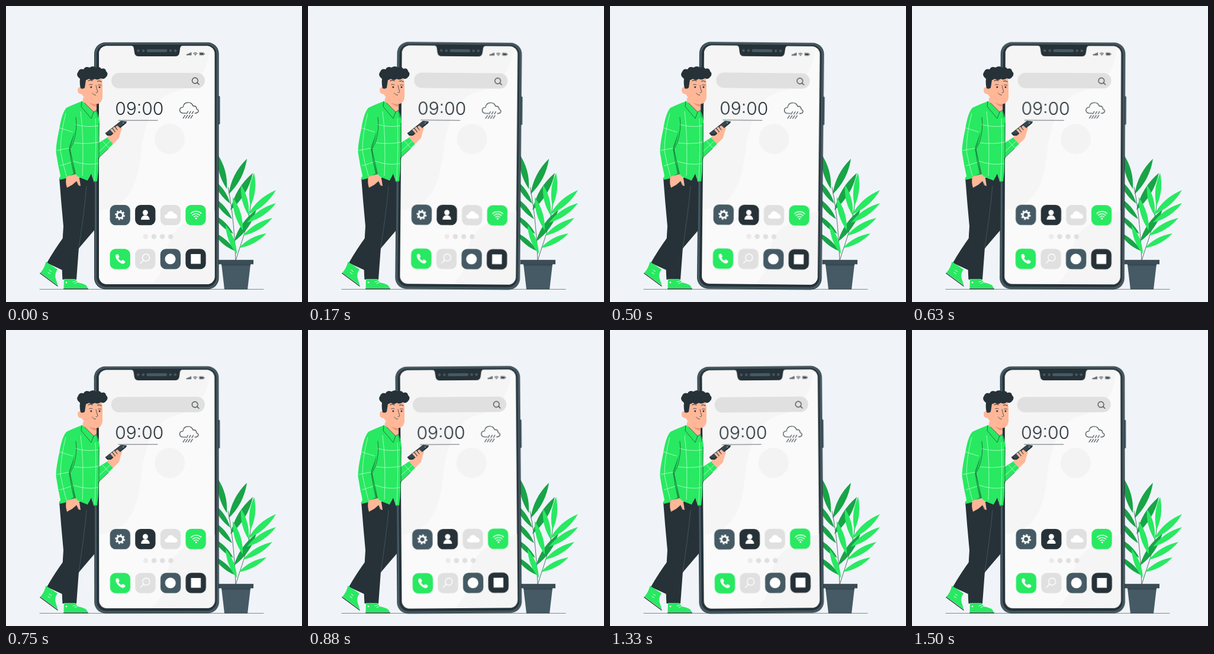
An HTML page for the animation above (1540 ms loop, 500 px wide and 500 px high).

```html
<!DOCTYPE html>
<html lang="en">
<head>
<meta charset="utf-8">
<title>Phone home screen</title>
<style>
  html, body { margin: 0; width: 100%; height: 100%; overflow: hidden; background: #f0f4f9; }
  svg { display: block; width: 100vw; height: 100vh; }
  #phone { transform-box: view-box; transform-origin: 255px 270px; }
  .ink { fill: #263238; }
  .slate { fill: #455a64; }
  .grey { fill: #e0e0e0; }
  .green { fill: #28e961; }
  .skin { fill: #ffb798; }
  .white { fill: #fff; }
  .line { fill: none; stroke: #263238; stroke-linecap: round; stroke-linejoin: round; }
  .chalk { fill: none; stroke: #fff; stroke-linecap: round; stroke-linejoin: round; }
  .plaid { fill: none; stroke: #c4ffd5; stroke-width: .75; }
  .clock { font: 300 30px Inter, "Open Sans", sans-serif; }
</style>
</head>
<body>
<svg viewBox="0 0 500 500">
  <path class="line" d="M57 478.500H435" stroke-width=".55"/>

  <g id="plant">
    <path class="line" d="M388 430C386 390 384 350 375 306M388 430C397 400 410 370 414 330" stroke-width=".7"/>
    <g id="leaves"></g>
    <path class="slate" d="M364 436H413L408 479H369Z"/>
    <path d="M364 436H413L412.700 438.500H364.300Z" fill="#37474f"/>
    <rect x="358.500" y="428.800" width="59.500" height="7.500" fill="#3b4d56"/>
  </g>

  <g id="back-leg">
    <path class="ink" d="M120 290H155V372Q141 388 125 407L95 446L69 434Q82 411 99 388Z"/>
    <path class="green" d="M67.500 432L87 445Q82 452 83.500 459L87.500 472L58 450.500Q65 443 67.500 432Z"/>
    <path class="line" d="M57.800 451.500L87 473" stroke-width="1.300"/>
    <path class="chalk" d="M73 446l3.500 2.500M71 450l3.500 2.500" stroke-width=".9"/>
  </g>

  <g id="phone">
    <rect class="slate" x="357.500" y="152" width="4" height="48" rx="1.500"/>
    <rect class="ink" x="149" y="61.500" width="210.500" height="417" rx="19"/>
    <rect class="slate" x="149.900" y="62.400" width="208.700" height="415.200" rx="18"/>
    <rect class="ink" x="153" y="65" width="202.500" height="409.500" rx="16"/>
    <clipPath id="screen"><rect x="157" y="67.500" width="195.500" height="402.500" rx="13"/></clipPath>
    <g clip-path="url(#screen)">
      <rect x="150" y="60" width="210" height="420" fill="#fafafa"/>
      <path d="M150 60H345C346 95 331 133 291 143C250 153 240 185 230 232C224 292 216 342 150 346Z" fill="#f5f5f5"/>
      <path d="M360 343C305 360 272 378 271 420C270 450 254 456 242 480H360Z" fill="#f5f5f5"/>
      <circle cx="276.500" cy="224.500" r="25.500" fill="#f3f3f3"/>
    </g>
    <path class="ink" d="M212 67Q215.500 67.500 216 72L217 79Q218 85 224 85H286Q292 85 293 79L294 72Q294.500 67.500 298 67Z"/>
    <rect class="slate" x="237.500" y="73" width="35" height="5" rx="2.500"/>
    <g class="slate">
      <circle cx="223.500" cy="75.500" r="2.300"/><circle cx="232" cy="75.500" r="2.300"/>
      <circle cx="278" cy="75.500" r="2.300"/><circle cx="286" cy="75.500" r="2.300"/>
    </g>

    <path class="ink" d="M305 81.300h1.500v1.900H305ZM307.200 80.500h1.500v2.700h-1.500ZM309.400 79.500h1.500v3.700h-1.500ZM311.600 78.500h1.500v4.700h-1.500Z"/>
    <path class="line" d="M316.500 79.900q3.300-2.600 6.600 0M317.900 81.400q1.900-1.500 3.800 0" stroke-width=".9"/>
    <circle class="ink" cx="319.800" cy="82.800" r=".8"/>
    <rect class="line" x="326.900" y="78.900" width="7.200" height="4" rx=".9" stroke-width=".7"/>
    <path class="ink" d="M327.800 79.700h5.400v2.400h-5.400ZM334.500 80.100h1v1.600h-1Z"/>

    <rect class="grey" x="178" y="113" width="158" height="26" rx="13"/>
    <g class="line" stroke-width="1.100"><circle cx="319.300" cy="126" r="4.900"/><path d="M322.900 129.500l3.300 3.100"/></g>

    <text class="clock ink" x="184.300" y="184">09:00</text>
    <path class="line" d="M190 193.200H256" stroke-width=".7"/>
    <path class="line" d="M304 181H299Q293.500 180.500 293.500 175.500Q294 171 299 171Q300 163 308 163Q314 163 316 169Q322 168 322 174Q325.500 175 325 178Q324 181 319 181" stroke-width="1.100"/>
    <path class="line" d="M307.500 178l-2.500 4M312 178l-2.500 4M316.500 178l-2.500 4M302.500 184.500l-3.300 5M306.800 184.500l-3.300 5M311 184.500l-3.300 5M315.300 184.500l-3.300 5" stroke-width="1.100"/>

    <g id="tiles"></g>
    <g class="chalk">
      <circle cx="192.500" cy="353.200" r="5" stroke-width="3"/>
      <circle cx="192.500" cy="353.200" r="7.200" stroke-width="2.400" pathLength="16" stroke-dasharray="1" style="stroke-linecap:butt"/>
      <path d="M312.500 350.300a12.200 12.200 0 0 1 17.200 0M315.100 353.200a8.500 8.500 0 0 1 12 0M317.700 356a5 5 0 0 1 6.800 0" stroke-width="1.500"/>
    </g>
    <g class="white">
      <circle cx="321.100" cy="358.800" r="1.500"/>
      <circle cx="235.300" cy="349" r="4.500"/>
      <path d="M228 361Q228.500 353.500 235.300 353.500T242.600 361Z"/>
      <path d="M272 359Q267.500 358.500 268 354.500Q269 351.500 272 352Q273 346.500 278 346.500Q282.500 346.500 284 350.500Q287.500 350 288 353Q290.500 355 289 357.500Q288 359 285 359Z"/>
      <path d="M185.300 420.500l2.800-1.500q1.500 0 3.300 4.200q.5 1.200-1.600 2.800q1.500 3.300 4.900 4.700q1.600-2.200 2.800-1.700q4 2 4 3.200l-1.700 2.600q-3.300 2.400-9.400-2.700q-6.500-6.300-5.100-11.600Z"/>
      <circle cx="277.500" cy="427.300" r="9"/>
      <rect x="312.300" y="419" width="16.500" height="16.500"/>
    </g>
    <g class="chalk" stroke-width="1.400"><circle cx="236.500" cy="425" r="6"/><path d="M232.200 429.500l-5 5"/></g>
  </g>

  <g id="man">
    <path class="ink" d="M90 290H151L143 320Q131 365 123 408L119 462H95.500Q93 430 97 372Q93 330 90 290Z"/>
    <path d="M136 304Q132 350 123 408" fill="none" stroke="#546a75" stroke-width=".6"/>
    <path class="green" d="M98 461H117L121 467Q136 469 138.500 477H97.500Z"/>
    <path class="line" d="M97.500 477.800H138.500" stroke-width="1.200"/>
    <path class="chalk" d="M113 466l4.500-1M116 469l4-2" stroke-width=".9"/>
    <circle class="white" cx="102" cy="467" r="1.300"/>

    <path class="skin" d="M130 155L153 158L153 182L146 186L129 169Z"/>
    <path d="M138 160Q145 166 153 165L152.500 170Q144 169 138 160Z" fill="#ee9470"/>
    <path class="green" d="M128 161Q112 167 102 172Q94 181 90 208Q83 240 85 250Q88 270 92 287L89 294L118 287L138 295L144 283L148 297L154 296Q157 275 156 257L181 233L171 222L157 231L158 195Q157 185 153 176L148 179L133 164Z"/>
    <path d="M116 212Q113 229 108 240L111 262L118 287L107 287L114 283Q109 262 106 240Q111 226 116 212Z" fill="#179b43"/>
    <path class="ink" d="M138 295L144 283L148 297Z"/>
    <path class="plaid" d="M101 181Q92 215 92 245Q96 267 102 287M126 178Q132 225 129 287M151 190Q153 230 150 294M91 206L113 213M86 244L107 240M91 270L110 264M117 200Q138 206 157 202M115 231Q137 234 157 230M113 262Q136 270 155 266M163 228L173 239M157 246L177 227"/>
    <path class="line" d="M118 188Q121 207 114 230L108 242L118 287M157 198V258M156 257L173 241M128 161L127 170L144 190L148 179L133 164M148 179L153 176L155 188" stroke-width=".65"/>

    <path class="skin" d="M102 288L118 284L124 291L126 304L122 303L119 296L112 302L103 307Q100 298 102 288Z"/>
    <path class="line" d="M119 296L123 303" stroke-width=".5"/>

    <path class="skin" d="M171 222L181 233L191 223Q193 214 196 206L191 201L178 207L174 216Z"/>
    <path class="ink" d="M167.500 215L194 194L204 195L203 198L177 219L171 219Z"/>
    <path d="M168 215L194.500 194.500L203.500 195.500L176 217Z" fill="#37474f"/>
    <circle class="white" cx="198" cy="197.500" r=".7"/>
    <path class="skin" d="M176 209l3-2 5 6-2 3ZM180 206l3-2 6 7-3 3ZM185 204l3-2 6 5-3 6Z"/>

    <path class="skin" d="M130 116H161L163 132V155Q161 166 151 166Q140 166 132 155L128 149Q121 149 121 142Q121 137 126 137Z"/>
    <path class="ink" d="M125 123Q117 117 122 111Q124 105 131 107Q134 101 141 104Q147 100 152 104Q158 101 161 106Q168 104 169 110Q174 115 169 120Q166 125 160 122Q155 126 150 123Q145 127 140 123Q136 125 135 125L133 138Q130 141 126 139Q124 132 125 123Z"/>
    <path class="line" d="M139 126.500Q142 124.500 146 126.500M154.500 127Q158 125.500 161 128" stroke-width="1.100"/>
    <path class="line" d="M140.500 133Q143 131.500 146 133M155.500 133.500Q158 132 161 134M152 134Q153 140 155 145Q154 147 152 146.500M145.500 147Q148 151 151.500 150.500" stroke-width=".75"/>
    <g class="ink"><circle cx="143.800" cy="137" r="1.500"/><circle cx="158" cy="137" r="1.500"/></g>
  </g>
</svg>
<script>
  const byId = id => document.getElementById(id);

  // Leaves run from base to tip: x0, y0, x1, y1.
  const leaf = (x0, y0, x1, y1, fill) => {
    const k = .17, mx = (x0 + x1) / 2, my = (y0 + y1) / 2;
    const dx = (y0 - y1) * k, dy = (x1 - x0) * k;
    return `<path fill="${fill}" d="M${x0} ${y0}Q${mx + dx} ${my + dy} ${x1} ${y1}Q${mx - dx} ${my - dy} ${x0} ${y0}"/>`;
  };
  const dark = [
    [373, 309, 357, 250], [376, 318, 407, 258], [379, 345, 417, 282],
    [379, 334, 350, 293], [382, 360, 350, 323], [384, 385, 350, 352],
    [387, 414, 350, 382], [385, 398, 423, 344]
  ];
  const light = [
    [413, 338, 419, 282], [410, 354, 397, 302], [409, 352, 456, 311],
    [407, 366, 456, 333], [400, 379, 383, 323], [400, 388, 450, 358],
    [393, 409, 440, 384], [390, 419, 371, 370]
  ];
  byId('leaves').innerHTML =
    dark.map(p => leaf(...p, '#18a447')).join('') +
    light.map(p => leaf(...p, '#28e961')).join('');

  const rows = [
    [336, 'slate', 'ink', 'grey', 'green'],
    [410.3, 'green', 'grey', 'slate', 'ink']
  ];
  const tiles = rows.flatMap(([y, ...tones]) => tones.map((tone, i) =>
    `<rect class="${tone}" x="${175.5 + 42.6 * i}" y="${y}" width="34.3" height="34.3" rx="9.500"/>`));
  const dots = [0, 1, 2, 3].map(i =>
    `<circle cx="${235.7 + 14.2 * i}" cy="389.500" r="4.200" fill="${i ? '#e0e0e0' : '#ebebeb'}"/>`);
  byId('tiles').innerHTML = tiles.concat(dots).join('');

  // Sway: time in ms, angle in degrees.
  const loop = 1540;
  const sway = [[0, 0], [350, 1], [1100, -1.03], [loop, 0]];
  byId('phone').animate(
    sway.map(([t, a]) => ({ offset: t / loop, transform: `rotate(${a}deg)` })),
    { duration: loop, iterations: Infinity, easing: 'linear' }
  );
</script>
</body>
</html>
```
